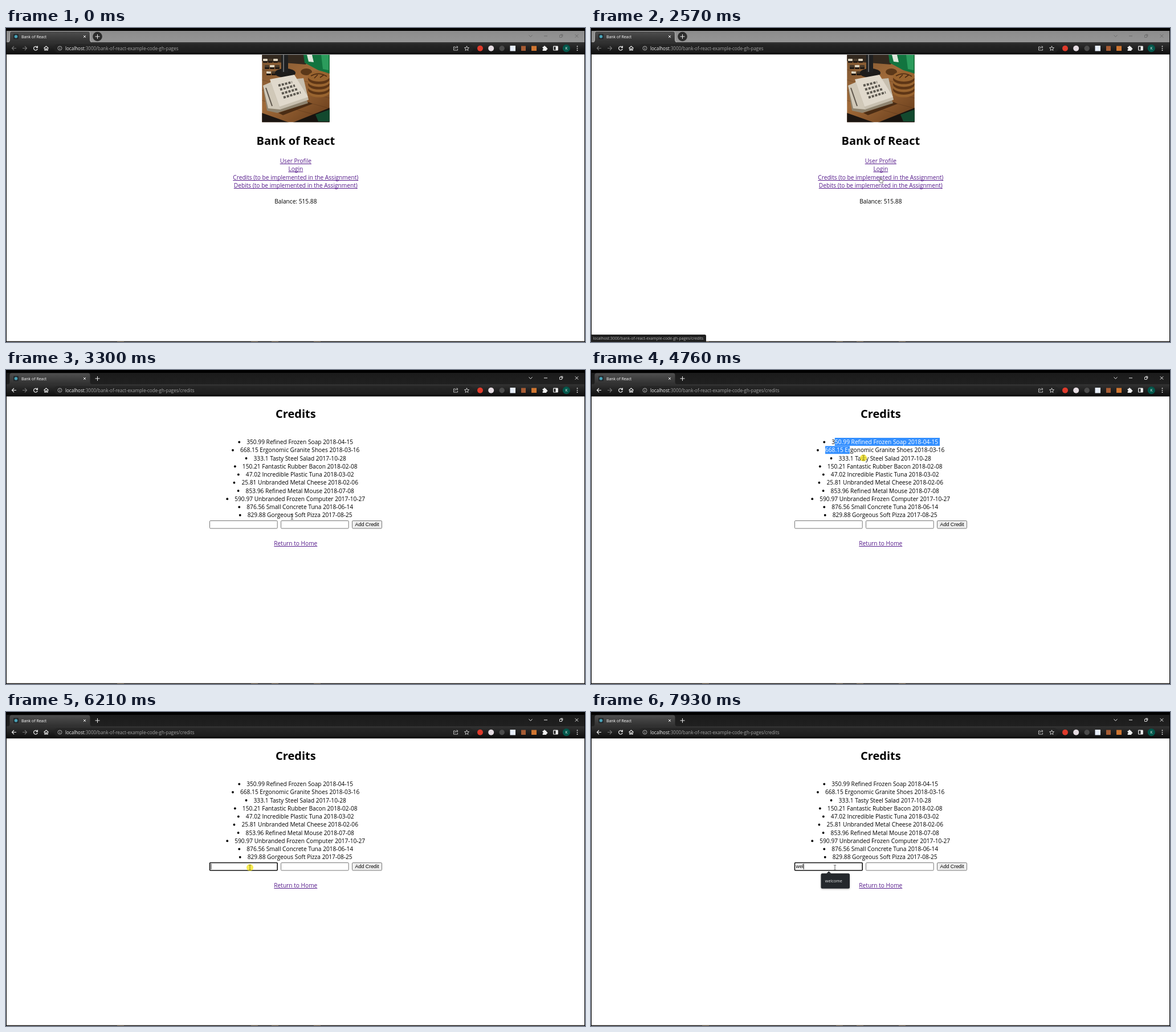
Recreate the animation shown at these times as an HTML page with a canvas. Size 1016 by 551 pixels, loop 8000 ms.

```html
<!DOCTYPE html>
<html lang="en">
<head>
<meta charset="utf-8">
<title>Bank of React</title>
<style>
  html, body { margin: 0; width: 100%; height: 100%; overflow: hidden; background: #000; }
  canvas { display: block; }
</style>
</head>
<body>
<canvas id="stage" width="1016" height="551"></canvas>
<script>
const ctx = document.getElementById('stage').getContext('2d');
const LOOP = 8000;
const UI = '"Open Sans", "Noto Sans", sans-serif';
const FORM = '"Liberation Sans", Arial, sans-serif';
const BODY = `10.17px ${UI}`;
const LINK = '#551a8b';
const CENTER = 508.3;
const ROW_TOP = 119, ROW_H = 14.25;

const TIME = {
  enter: 1600, hover: 2100, press: 2660, focus: 2730, open: 2870, statusOff: 3130,
  drag: 4300, release: 5300, clear: 5440, clearUp: 5510,
  field: 6120, fieldUp: 6420, keys: [7300, 7500, 7710]
};

const credits = [
  '350.99 Refined Frozen Soap 2018-04-15',
  '668.15 Ergonomic Granite Shoes 2018-03-16',
  '333.1 Tasty Steel Salad 2017-10-28',
  '150.21 Fantastic Rubber Bacon 2018-02-08',
  '47.02 Incredible Plastic Tuna 2018-03-02',
  '25.81 Unbranded Metal Cheese 2018-02-06',
  '853.96 Refined Metal Mouse 2018-07-08',
  '590.97 Unbranded Frozen Computer 2017-10-27',
  '876.56 Small Concrete Tuna 2018-06-14',
  '829.88 Gorgeous Soft Pizza 2017-08-25'
];

// Pointer stops: time, x, y
const route = [
  [1600, 522, 548], [2080, 511, 272], [2250, 509, 267], [2900, 509, 267],
  [3300, 502, 258], [3860, 455, 198], [4200, 428, 121], [4300, 428, 121],
  [4670, 454, 142], [4760, 478, 154], [5050, 498, 200], [5300, 490, 233],
  [5580, 478, 238], [6050, 428, 273], [LOOP, 428, 273]
];

function pointerAt(t) {
  const i = Math.max(1, route.findIndex(p => p[0] >= t));
  const [t0, x0, y0] = route[i - 1], [t1, x1, y1] = route[i];
  const k = Math.max(0, (t - t0) / (t1 - t0));
  return { x: x0 + (x1 - x0) * k, y: y0 + (y1 - y0) * k };
}

const within = (t, a, b) => t >= a && t < b;

function rect(x, y, w, h, fill) {
  ctx.fillStyle = fill;
  ctx.fillRect(x, y, w, h);
}
function round(x, y, w, h, r, fill, stroke, line = 1) {
  ctx.beginPath();
  ctx.roundRect(x, y, w, h, r);
  if (fill) { ctx.fillStyle = fill; ctx.fill(); }
  if (stroke) { ctx.strokeStyle = stroke; ctx.lineWidth = line; ctx.stroke(); }
}
function oval(x, y, rx, ry, fill) {
  ctx.beginPath();
  ctx.ellipse(x, y, rx, ry, 0, 0, Math.PI * 2);
  ctx.fillStyle = fill;
  ctx.fill();
}
const disc = (x, y, r, fill) => oval(x, y, r, r, fill);
function shape(fill, ...points) {
  ctx.beginPath();
  points.forEach(p => ctx.lineTo(...p));
  ctx.closePath();
  ctx.fillStyle = fill;
  ctx.fill();
}
function stroke(d, color, width = 1, x = 0, y = 0) {
  ctx.save();
  ctx.translate(x, y);
  ctx.strokeStyle = color;
  ctx.lineWidth = width;
  ctx.stroke(new Path2D(d));
  ctx.restore();
}
function text(s, x, y, font, fill, align = 'left') {
  ctx.font = font;
  ctx.textAlign = align;
  ctx.fillStyle = fill;
  ctx.fillText(s, x, y);
}
function vertical(y0, y1, a, b) {
  const g = ctx.createLinearGradient(0, y0, 0, y1);
  g.addColorStop(0, a);
  g.addColorStop(1, b);
  return g;
}
function link(s, y) {
  text(s, CENTER, y, BODY, LINK, 'center');
  const w = ctx.measureText(s).width;
  rect(CENTER - w / 2, Math.round(y) + 1, w, 1, LINK);
}

function drawTabs(active) {
  rect(0, 0, 1016, 551, '#000');
  rect(1, 5, 1014, 20, active ? vertical(5, 25, '#1b1b1b', '#202020') : vertical(5, 25, '#8c8c8c', '#959595'));
  ctx.beginPath();
  ctx.moveTo(3, 25);
  ctx.quadraticCurveTo(6.5, 25, 6.5, 21);
  ctx.lineTo(6.5, 9);
  ctx.quadraticCurveTo(6.5, 5.5, 10, 5.5);
  ctx.lineTo(144, 5.5);
  ctx.quadraticCurveTo(147.5, 5.5, 147.5, 9);
  ctx.lineTo(147.5, 21);
  ctx.quadraticCurveTo(147.5, 25, 151, 25);
  ctx.fillStyle = vertical(5, 25, '#505050', '#303030');
  ctx.fill();
  if (!active) {
    ctx.strokeStyle = '#c4c4c4';
    ctx.lineWidth = 0.8;
    ctx.stroke();
  }
  round(13, 10.5, 9, 9, 1, '#22272a');
  disc(17.5, 15, 2.8, '#4aa3b8');
  text('Bank of React', 27, 17.6, `6.95px ${UI}`, '#fff');
  stroke('M-2 -2L2 2M2 -2L-2 2', '#f0f0f0', 1, 138, 15);
  if (!active) disc(160.5, 15, 8.3, '#2c2c2c');
  stroke('M-4 0H4M0 -4V4', '#eee', 1, 160.5, 15);

  const tint = active ? '#eee' : '#6b6b6b';
  stroke('M-3 -1.5L0 1.5L3 -1.5', tint, 1, 920.5, 14);
  stroke('M-3 0H3', tint, 1, 947, 14);
  stroke('M-2.5 -1.5H1.5V2.5H-2.5ZM-1 -2.8H2.8V1', tint, 0.9, 974, 14);
  stroke('M-2.7 -2.7L2.7 2.7M2.7 -2.7L-2.7 2.7', tint, 1, 1001.5, 14);
}

function drawToolbar(onCredits) {
  rect(1, 25, 1014, 21, vertical(25, 46, '#333', '#0d0d0d'));
  round(84, 28, 736, 15, 7.5, vertical(28, 43, '#272727', '#1c1c1c'));
  stroke('M4 0H-3.5M0 -3.5L-3.5 0L0 3.5', onCredits ? '#f0f0f0' : '#777', 1.1, 14, 35.5);
  stroke('M-4 0H3.5M0 -3.5L3.5 0L0 3.5', '#777', 1.1, 33, 35.5);
  stroke('M2.6 -2A3.4 3.4 0 1 0 3.3 1M3.4 -4V-1H0.4', '#f0f0f0', 1.2, 52, 35.5);
  stroke('M-4 0L0 -3.6L4 0M-2.7 -1V3.4H-0.8V0.8H0.8V3.4H2.7V-1', '#f0f0f0', 1.1, 70.5, 35.5);
  stroke('M3.5 0A3.5 3.5 0 1 1 -3.5 0A3.5 3.5 0 1 1 3.5 0M0 -0.5V2M0 -2V-1.2', '#bbb', 0.9, 94.5, 35.5);

  const font = `8.03px ${UI}`;
  text('localhost', 104, 38.6, font, '#f1f1f1');
  const hostWidth = ctx.measureText('localhost').width;
  text(':3000/bank-of-react-example-code-gh-pages' + (onCredits ? '/credits' : ''), 104 + hostWidth, 38.6, font, '#a2a2a2');

  stroke('M-1 -2.5H-4V3.5H3V1M-2 1C-1.5 -1.5 0 -2 3 -2M1.2 -4L3.6 -2L1.2 0', '#ccc', 0.9, 789.5, 35.5);
  stroke('M0 -4L1.1 -1.2L4 -1L1.8 0.9L2.5 3.7L0 2.2L-2.5 3.7L-1.8 0.9L-4 -1L-1.1 -1.2Z', '#ddd', 0.9, 808.5, 35.7);
  disc(832, 35.7, 5, '#df3a2b');
  disc(851.2, 35.7, 5, '#e5dce2');
  disc(870.2, 35.7, 4.7, '#4b4b4b');
  rect(884.5, 31, 9.5, 9.5, '#e6edf9');
  rect(904, 31.5, 8, 8.5, '#a65c34');
  rect(922, 31.5, 9, 8.5, '#cf7631');
  round(941.5, 33, 7, 7, 1, '#f0f0f0');
  disc(945, 32.8, 1.6, '#f0f0f0');
  disc(948.7, 36.5, 1.6, '#f0f0f0');
  disc(941.5, 36.5, 1.2, '#171717');
  round(960.7, 32.2, 7.4, 6.8, 0.5, null, '#f0f0f0', 1.2);
  rect(964.5, 32, 3.8, 7, '#f0f0f0');
  disc(983.3, 35.7, 6.6, '#00574b');
  text('K', 983.3, 38.4, `7px ${UI}`, '#e4f0ed', 'center');
  [-3.4, 0, 3.4].forEach(d => disc(1002.5, 35.6 + d, 0.9, '#f0f0f0'));
  rect(1, 46.4, 1014, 503.4, '#fff');
  rect(1, 549.8, 1014, 1.2, '#15120f');
  [195, 430, 466, 540].forEach(x => rect(x, 550, 12, 1, '#57452d'));
}

function drawPhoto() {
  ctx.save();
  ctx.beginPath();
  ctx.rect(449.3, 47, 118.4, 118.3);
  ctx.clip();
  const wood = ctx.createLinearGradient(449, 47, 540, 165);
  wood.addColorStop(0, '#7a5430');
  wood.addColorStop(0.5, '#a06a39');
  wood.addColorStop(1, '#70431f');
  rect(449, 47, 119, 119, wood);
  shape('#33291f', [449, 47], [535, 47], [526, 64], [449, 58]);
  shape('#12743f', [522, 47], [568, 47], [568, 80], [548, 74], [524, 61]);
  shape('#2b9c5c', [553, 47], [566, 47], [566, 74], [556, 72]);
  shape('#dfe8dc', [528, 47], [537, 47], [540, 60], [531, 59]);
  for (let i = 0; i < 9; i++) {
    const x = 451 + i % 3 * 8 + i, y = 54 + (i / 3 | 0) * 11;
    round(x, y + 2, 8, 5, 1, '#211a14');
    round(x, y, 8, 4, 1, i % 2 ? '#4a3c2c' : '#ded3bd');
  }
  for (let i = 0; i < 4; i++) {
    stroke(`M449 ${73 + i * 18}L568 ${105 + i * 18}`, '#4b2d1655', 1.2);
  }
  oval(490, 79, 18, 8, '#1d1c1b');
  rect(483, 47, 12, 31, '#1f2021');
  rect(486, 47, 2, 30, '#66686a');
  oval(527, 77, 10, 6, '#5b3819');
  for (let i = 6; i >= 0; i--) {
    oval(549, 85 + i * 4.6, 19, 9, i % 2 ? '#5e3616' : '#99642f');
  }
  stroke('M535 84Q549 76 563 85M541 88L547 82M551 87L558 82', '#4d2b12', 1.6);
  shape('#1c1612', [449, 149], [497, 166], [449, 166]);
  shape('#17130f', [503, 166], [568, 140], [568, 166]);
  shape('#12492e', [543, 152], [568, 143], [568, 164], [548, 164]);
  shape('#4a2c14', [478, 149], [531, 130], [538, 133], [486, 153]);
  shape('#8f8470', [452, 109], [516, 95], [530, 132], [476, 149], [458, 145]);
  shape('#d0c8b8', [451, 101], [467, 94], [482, 143], [460, 141]);
  shape('#c7bfaf', [464, 94], [522, 88], [531, 126], [481, 143]);
  shape('#e0d9cc', [463, 90], [506, 82], [530, 121], [480, 138]);
  ctx.setLineDash([4, 2]);
  for (let i = 0; i < 4; i++) {
    stroke(`M${478 + i * 3} ${101 + i * 7}L${502 + i * 5} ${95 + i * 6}`, '#5c5850', 4);
  }
  ctx.setLineDash([]);
  stroke('M456 105L467 137', '#5f574d', 2);
  ctx.restore();
}

function drawHome() {
  drawPhoto();
  text('Bank of React', CENTER, 205.4, `bold 20px ${UI}`, '#000', 'center');
  const links = ['User Profile', 'Login', 'Credits (to be implemented in the Assignment)',
    'Debits (to be implemented in the Assignment)'];
  links.forEach((s, i) => link(s, 237 + i * ROW_H));
  text('Balance: 515.88', CENTER, 308, BODY, '#000', 'center');
}

function drawCredits(t) {
  text('Credits', CENTER, 84.2, `bold 20px ${UI}`, '#000', 'center');
  const selecting = within(t, TIME.drag, TIME.clear);
  const end = pointerAt(Math.min(t, TIME.release) - 90);
  const lastRow = Math.min(9, Math.floor((end.y - ROW_TOP) / ROW_H));

  credits.forEach((line, i) => {
    const top = ROW_TOP + i * ROW_H, base = top + 11;
    ctx.font = BODY;
    const width = ctx.measureText(line).width;
    const left = CENTER + 7.4 - width / 2;
    disc(left - 13, top + 7.5, 1.9, '#000');
    text(line, left, base, BODY, '#000');
    if (!selecting || i > lastRow) return;
    const from = i ? left : 427.5;
    const to = i < lastRow ? left + width + 3 : Math.min(end.x, left + width);
    if (to <= from) return;
    ctx.save();
    ctx.beginPath();
    ctx.rect(from, top, to - from, ROW_H);
    ctx.clip();
    rect(from, top, to - from, ROW_H, '#338fff');
    text(line, left, base, BODY, '#fff');
    ctx.restore();
  });
  drawForm(t);
  link('Return to Home', 308);
}

function drawForm(t) {
  const focused = t >= TIME.field;
  const font = `8.89px ${FORM}`;
  round(357.5, 264.5, 118.7, 13.5, 1.3, '#fff', focused ? '#101010' : '#767676', focused ? 1.6 : 1);
  round(482.5, 264.5, 118.7, 13.5, 1.3, '#fff', '#767676');
  round(607.5, 264.5, 52, 13.5, 1.6, '#efefef', '#767676');
  text('Add Credit', 633.5, 274.3, font, '#000', 'center');
  if (!focused) return;

  const typed = TIME.keys.filter(k => t >= k);
  const value = 'wel'.slice(0, typed.length);
  text(value, 359.5, 274.3, font, '#000');
  const since = t - (typed.length ? typed[typed.length - 1] : TIME.field);
  if (since % 1000 < 500) rect(359.4 + ctx.measureText(value).width, 266.2, 0.9, 10, '#000');
  if (!value) return;

  ctx.save();
  ctx.shadowColor = '#0005';
  ctx.shadowBlur = 3;
  ctx.shadowOffsetY = 1;
  round(403.5, 283.3, 50.5, 26.5, 2.5, '#24282c');
  ctx.restore();
  shape('#24282c', [413, 283.5], [417.3, 279.5], [421.6, 283.5]);
  text('welcome', 410.8, 298.8, `7.2px ${UI}`, '#e9eaeb');
}

function drawStatus() {
  round(0, 538, 202, 14, [0, 2.5, 0, 0], '#202020');
  text('localhost:3000/bank-of-react-example-code-gh-pages/credits', 3.5, 547, `6.87px ${UI}`, '#b5b5b5');
}

function drawPointer(t) {
  if (t < TIME.enter) return;
  const { x, y } = pointerAt(t);
  const pressed = within(t, TIME.press, TIME.open) || within(t, TIME.drag, TIME.release) ||
    within(t, TIME.clear, TIME.clearUp) || within(t, TIME.field, TIME.fieldUp);
  if (pressed) disc(x, y, 6, 'rgba(245, 230, 35, 0.8)');
  if (within(t, TIME.hover, TIME.open + 60)) {
    const hand = 'M-1.8 1V-4.2Q-1 -5.3 -0.2 -4.2V-0.8L2.5 -0.2Q3.5 0 3.4 1.2L2.6 4.8H-1.2L-3.7 1.6Q-3.5 0 -1.8 1Z';
    ctx.save();
    ctx.translate(x, y);
    ctx.fillStyle = '#fff';
    ctx.fill(new Path2D(hand));
    ctx.restore();
    stroke(hand, '#444', 0.8, x, y);
  } else if (t < TIME.hover) {
    const arrow = [[0, 0], [0, 9.5], [2.2, 7.5], [3.8, 11], [5.2, 10.3], [3.7, 7], [6.7, 7]];
    shape('#fff', ...arrow.map(p => [x + p[0], y + p[1]]));
    ctx.strokeStyle = '#222';
    ctx.lineWidth = 0.7;
    ctx.stroke();
  } else {
    stroke('M-2.2 -4.3H-0.5L0 -3.8L0.5 -4.3H2.2M0 -4V4M-2.2 4.3H-0.5L0 3.8L0.5 4.3H2.2', pressed ? '#6b6520' : '#333', 0.8, x, y);
  }
}

function render(t) {
  const onCredits = t >= TIME.open;
  drawTabs(t >= TIME.focus);
  drawToolbar(onCredits);
  if (onCredits) drawCredits(t);
  else drawHome();
  if (within(t, TIME.hover, TIME.statusOff)) drawStatus();
  drawPointer(t);
}

const start = performance.now();
function tick() {
  render((performance.now() - start) % LOOP);
  requestAnimationFrame(tick);
}
tick();
</script>
</body>
</html>
```
